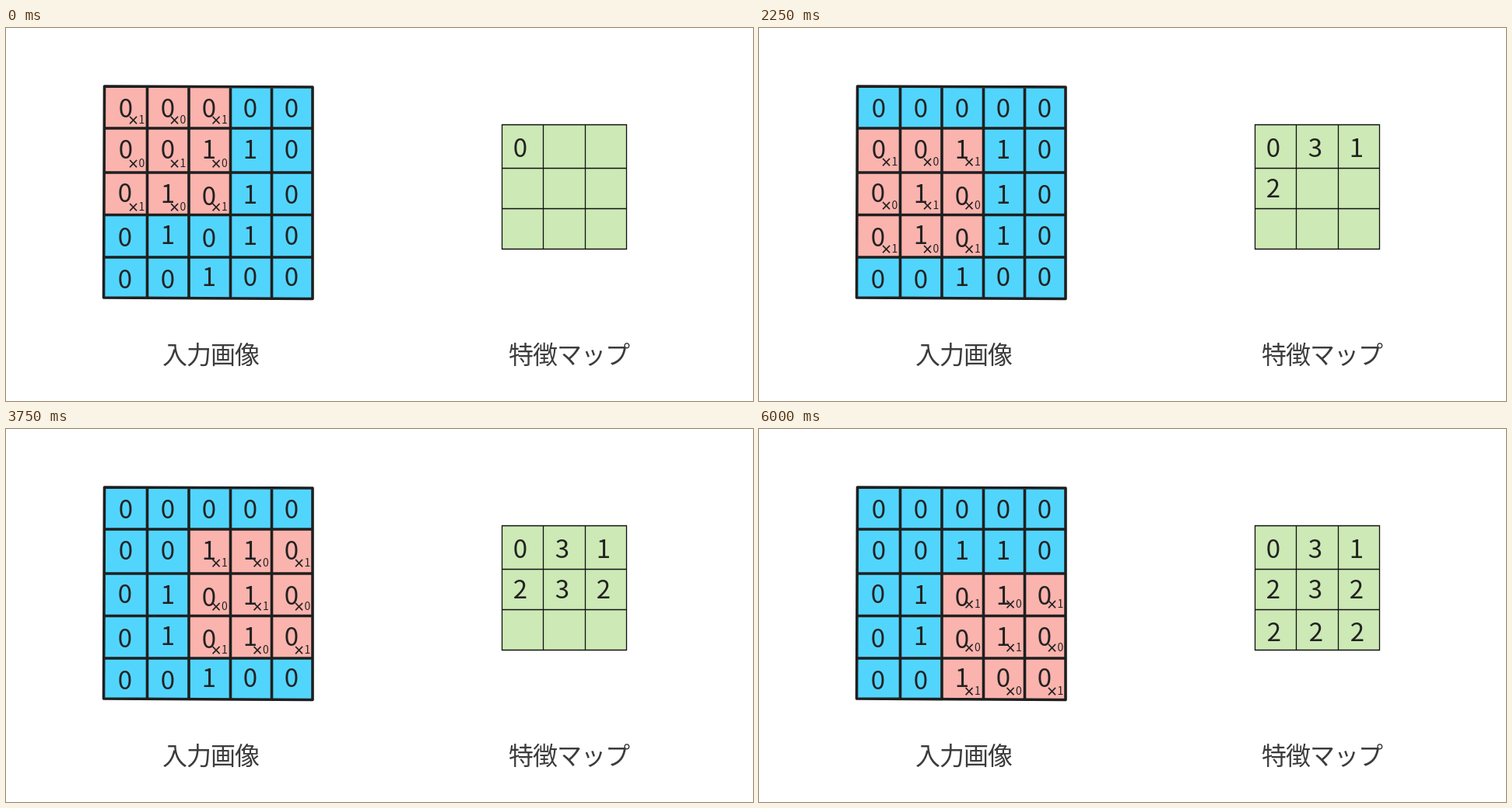
These frames come from a looping animation (960x480 px, 6750 ms). An HTML page:

```html
<!DOCTYPE html>
<html lang="ja">
<head>
<meta charset="utf-8">
<title>畳み込み</title>
<style>
  html, body { margin: 0; width: 100%; height: 100%; overflow: hidden; background: #fff; }
  svg { display: block; width: 960px; height: 480px; }
  text { font-family: "Noto Sans CJK JP", "Noto Sans CJK", sans-serif; text-anchor: middle; fill: #222; }
  .digit { font-size: 33px; }
  .weight { font-size: 14px; }
  .times { font: 300 23px "Noto Sans", sans-serif; }
  .caption { font-size: 32px; font-weight: 300; letter-spacing: -1px; fill: #3c3c3c; }
  .frame { fill: none; stroke: #1f1f1f; stroke-width: 3.6; stroke-linejoin: round; }
  .thin { fill: none; stroke: #111; stroke-width: 1.3; }
</style>
</head>
<body>
<svg id="stage" viewBox="0 0 960 480"></svg>
<script>
const STEP = 750, STEPS = 9;
const BLUE = "#52d5fd", PINK = "#fbb3ad", GREEN = "#cde9b5";
const input = ["00000", "00110", "01010", "01010", "00100"].map(row => [...row].map(Number));
const kernel = ["101", "010", "101"].map(row => [...row].map(Number));

const inX = [126.5, 181.5, 235, 288.5, 341.5, 394];
const inY = [75.5, 129, 186, 240.5, 295, 348];
const digitX = [154, 208, 261, 314, 367];
const digitY = [
  [103, 103, 103, 103, 103],
  [156, 156, 156, 156, 156],
  [212, 213, 216, 214, 214],
  [269, 266, 270, 267, 267],
  [323, 323, 320, 320, 320]
];
const weightX = [168, 221, 274.5, 327.5, 381];
const weightY = [118, 172, 225];
const outX = [637.5, 690.5, 744.5, 797.5];
const outY = [124.5, 180.5, 232.5, 284.5];
const resultX = [661, 715, 768], resultY = [154, 206, 260.5];

const stage = document.getElementById("stage");

function add(tag, attrs, content = "", parent = stage) {
  const node = document.createElementNS("http://www.w3.org/2000/svg", tag);
  for (const key in attrs) node.setAttribute(key, attrs[key]);
  node.textContent = content;
  return parent.appendChild(node);
}

const label = (cls, x, y, content, parent) => add("text", { class: cls, x, y }, content, parent);

const cell = (xs, ys, r, c, fill) => add("rect", {
  x: xs[c], y: ys[r], width: xs[c + 1] - xs[c], height: ys[r + 1] - ys[r], fill
});

const each = (n, visit) => {
  for (let r = 0; r < n; r++) for (let c = 0; c < n; c++) visit(r, c);
};

const cells = [], results = [], windows = [];

each(5, (r, c) => cells.push(cell(inX, inY, r, c, BLUE)));
const innerLines = inX.slice(1, 5).map(x => `M${x} 75V348`).join("") +
  inY.slice(1, 5).map(y => `M126 ${y}H394`).join("");
add("path", { class: "frame", d: innerLines + "M126.5 75L394 76L394 348.5L125.5 347Z" });
each(5, (r, c) => label("digit", digitX[c] + (c === 0 && r > 1 ? -1 : 0), digitY[r][c] + 12, input[r][c]));

each(3, (r, c) => cell(outX, outY, r, c, GREEN));
add("path", {
  class: "thin",
  d: outX.map(x => `M${x} 124V285`).join("") + outY.map(y => `M637 ${y}H798`).join("")
});

// One weight overlay and one weighted sum per kernel position.
each(3, (top, left) => {
  const overlay = add("g", {});
  let sum = 0;
  each(3, (r, c) => {
    const x = weightX[left + c], y = weightY[top] + 56 * r;
    sum += kernel[r][c] * input[top + r][left + c];
    label("times", x - 4.5, y + 8.5, "×", overlay);
    label("weight", x + 6.5, y + 5, kernel[r][c], overlay);
  });
  windows.push(overlay);
  results.push(label("digit", resultX[left] + (top === 2 ? 1 : 0), resultY[top] + 12, sum));
});

label("caption", 263, 432, "入力画像");
label("caption", 723.5, 432, "特徴マップ");

let shown = -1;
function show(step) {
  if (step === shown) return;
  shown = step;
  const top = Math.floor(step / 3), left = step % 3;
  cells.forEach((rect, i) => {
    const r = Math.floor(i / 5) - top, c = i % 5 - left;
    rect.setAttribute("fill", r >= 0 && r < 3 && c >= 0 && c < 3 ? PINK : BLUE);
  });
  windows.forEach((g, i) => g.style.display = i === step ? "" : "none");
  results.forEach((t, i) => t.style.display = i <= step ? "" : "none");
}

const start = performance.now();
function tick() {
  show(Math.floor((performance.now() - start) / STEP) % STEPS);
  requestAnimationFrame(tick);
}
tick();
</script>
</body>
</html>
```
